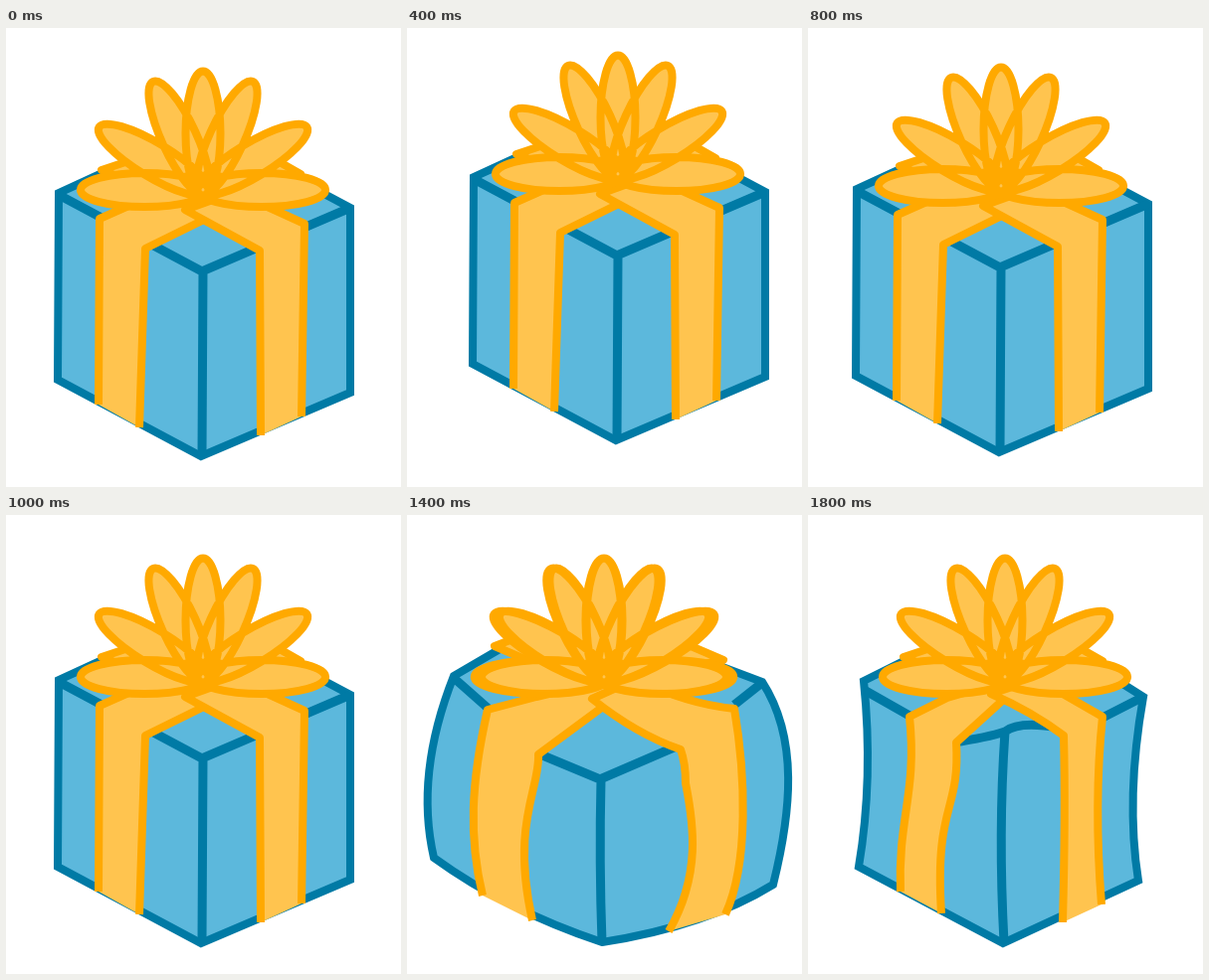
Recreate the animation shown at these times as an HTML page with a canvas. Size 397 px wide and 462 px high, loop 2000 ms.

```html
<!DOCTYPE html>
<html lang="en">
<head>
<meta charset="utf-8">
<title>Gift box</title>
<style>
  html, body { margin: 0; width: 397px; height: 462px; overflow: hidden; background: #fff; }
  canvas { display: block; }
</style>
</head>
<body>
<canvas id="stage" width="397" height="462"></canvas>
<script>
const ctx = document.getElementById('stage').getContext('2d');
const BLUE = '#5cb8dc', NAVY = '#007aa5', GOLD = '#ffc44f', ORANGE = '#ffa900';
const STEP = 200;
const TAILS = 'M135 130L96 143L130 156M268 131L296 147L268 156';

// Each pose: box outline, inner box edges, ribbon ends and bands, sideways spread of the bow.
const still = {
  box: 'M112 139L53 166L52 354L196 431L346 367V181L288 150',
  edges: 'M53 168L197 245L346 181M198 245L197 430',
  tails: TAILS,
  left: 'M93 379L94 192L130 176L205 165V190L140 222L134 402',
  right: 'M256 410L255 224L180 183L230 165L300 197L297 391',
  spread: 1.03
};
const plump = {
  box: 'M112 139L50 168C38 215 33 295 40 354L196 431L361 361C370 300 362 230 352 175L288 150',
  edges: 'M51 172L88 202M126 235Q165 238 197 247Q230 234 270 232M314 203L352 176M197 247V430',
  tails: TAILS,
  left: 'M81 382C70 335 74 270 86 203Q105 190 180 185L205 168V187Q160 214 130 238C118 300 116 345 127 404',
  right: 'M259 412Q277 320 269 237Q240 222 182 184L230 165Q270 192 312 202C322 262 324 310 308 392',
  spread: 1.05
};
const fat = {
  box: 'M112 124L47 162C26 215 12 280 27 345Q100 398 196 430Q300 414 368 372C386 300 394 225 357 168L288 142',
  edges: 'M47 164L82 195M134 241L194 266L282 228M329 191L358 168M195 266Q193 350 196 430',
  tails: 'M140 112L88 132L130 150M262 122L318 146L268 156',
  left: 'M76 383C62 325 64 270 81 196L130 183L205 165V187L132 241C134 275 104 310 126 408',
  right: 'M263 419C296 362 288 310 280 270Q280 250 275 236Q231 221 186 185L230 165Q280 190 329 195C340 260 344 350 320 402',
  spread: 1.09
};
const pinched = {
  box: 'M112 139L56 167Q66 265 51 354L196 431L332 368Q319 285 337 183L288 152',
  edges: 'M58 177L102 202M146 229Q180 224 198 218Q212 207 252 214M296 204L337 183M198 218Q191 320 197 430',
  tails: TAILS,
  left: 'M93 379C90 305 110 280 102 203L140 184L205 165V178L149 229C153 300 127 290 134 401',
  right: 'M256 410Q259 300 257 222Q225 198 184 180L230 165L296 203Q287 290 295 392',
  spread: 1.03
};

const timeline = [
  [still, 0, 0], [still, 14, -10], [still, 14, -16], [still, 0, -16], [still, -4, -4],
  [still, 0, 0], [plump, 0, 0], [fat, 0, 0], [still, 0, 0], [pinched, 0, 0]
];

function paint(path, fill, line, width) {
  const shape = new Path2D(path);
  if (fill) { ctx.fillStyle = fill; ctx.fill(shape); }
  ctx.strokeStyle = line;
  ctx.lineWidth = width;
  ctx.stroke(shape);
}

function bowPath(spread) {
  const petal = new Path2D(), bow = new Path2D();
  petal.ellipse(0, -57, 17, 62.5, 0, 0, 2 * Math.PI);
  for (const angle of [-90, -58, -24, 0, 24, 58, 90]) {
    bow.addPath(petal, new DOMMatrix().translate(198, 163).scale(spread, 1).rotate(angle));
  }
  return bow;
}

function draw([pose, dx, dy]) {
  ctx.setTransform(1, 0, 0, 1, 0, 0);
  ctx.fillStyle = '#fff';
  ctx.fillRect(0, 0, 397, 462);
  ctx.translate(dx, dy);
  ctx.lineJoin = 'miter';
  paint(pose.box, BLUE, NAVY, 8);
  paint(pose.edges, null, NAVY, 9);
  ctx.lineJoin = 'round';
  for (const part of [pose.tails, pose.left, pose.right]) paint(part, GOLD, ORANGE, 8);
  const bow = bowPath(still.spread);
  if (pose.spread > still.spread) bow.addPath(bowPath(pose.spread));
  paint(bow, GOLD, ORANGE, 8);
}

function tick() {
  draw(timeline[Math.floor(performance.now() / STEP) % timeline.length]);
  requestAnimationFrame(tick);
}
tick();
</script>
</body>
</html>
```
